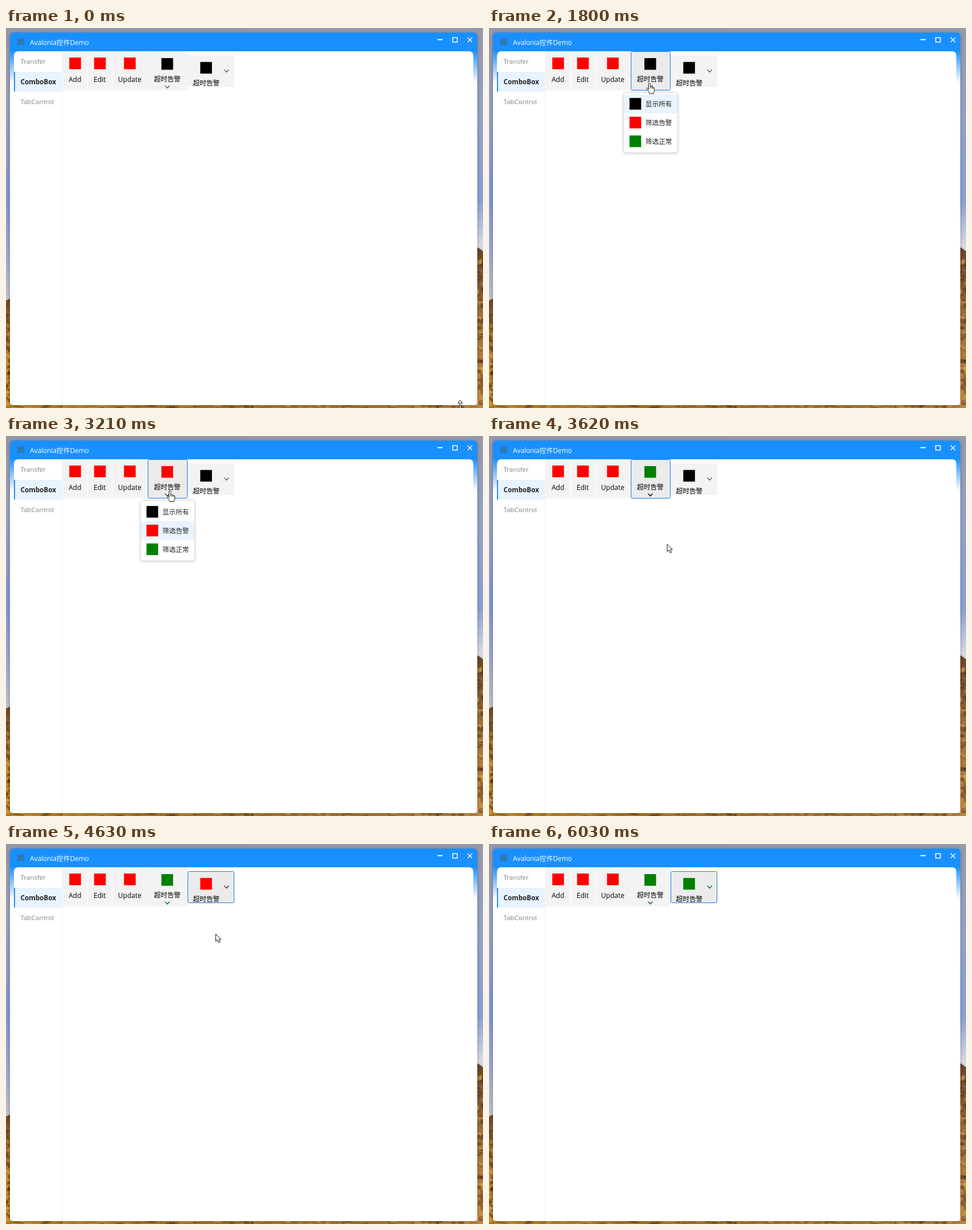
Recreate the animation shown at these times as an HTML page. Size 838 by 669 pixels, loop 6630 ms.

```html
<!DOCTYPE html>
<html lang="zh-CN">
<head>
<meta charset="utf-8">
<title>Avalonia控件Demo</title>
<style>
html, body { margin: 0; width: 100%; height: 100%; overflow: hidden; }
svg { display: block; width: 838px; height: 669px; }
text { font-family: "Open Sans", "Noto Sans CJK SC", "Noto Sans CJK", sans-serif; font-size: 11.7px; white-space: pre; }
.title { font-size: 11.8px; font-weight: 500; fill: #fff; }
.tool { font-size: 12px; }
.nav { fill: #808080; font-size: 11.5px; }
</style>
</head>
<body>
<svg id="stage" viewBox="0 0 838 669" xmlns="http://www.w3.org/2000/svg">
  <defs>
    <linearGradient id="skyL" x2="0" y2="1">
      <stop offset="0" stop-color="#9496a9"/><stop offset=".2" stop-color="#9ba1bc"/>
      <stop offset=".45" stop-color="#8495cd"/><stop offset=".6" stop-color="#a0a8cf"/>
      <stop offset=".72" stop-color="#c2c2cd"/>
    </linearGradient>
    <linearGradient id="skyR" x2="0" y2="1">
      <stop offset="0" stop-color="#9799ab"/><stop offset=".25" stop-color="#93a2cc"/>
      <stop offset=".45" stop-color="#8b9dd2"/><stop offset=".57" stop-color="#d3d8e4"/>
    </linearGradient>
    <linearGradient id="rockL" x2="0" y2="1">
      <stop offset="0" stop-color="#6b4527"/><stop offset=".3" stop-color="#a06a2c"/>
      <stop offset="1" stop-color="#cf8c1c"/>
    </linearGradient>
    <linearGradient id="rockR" x2="0" y2="1">
      <stop offset="0" stop-color="#6a4529"/><stop offset=".5" stop-color="#a27039"/>
      <stop offset="1" stop-color="#c68f43"/>
    </linearGradient>
    <linearGradient id="ground">
      <stop offset="0" stop-color="#c78716"/><stop offset=".5" stop-color="#a46f22"/>
      <stop offset="1" stop-color="#b98238"/>
    </linearGradient>
    <linearGradient id="frame" gradientUnits="userSpaceOnUse" x1="0" y1="40" x2="0" y2="97">
      <stop offset="0" stop-color="#1890ff"/><stop offset="1" stop-color="#fff"/>
    </linearGradient>
    <filter id="soft" x="-10%" y="-10%" width="120%" height="120%"><feGaussianBlur stdDeviation="2.5"/></filter>
    <clipPath id="label2"><rect x="320" y="48" width="80" height="54.5"/></clipPath>
    <clipPath id="land"><path id="ridge" d="M0 480L7 476V664H828V386L833 389L838 393V669H0Z"/></clipPath>
  </defs>

  <rect width="419" height="669" fill="url(#skyL)"/>
  <rect x="419" width="419" height="669" fill="url(#skyR)"/>
  <path d="M0 480L7 476V669H0Z" fill="url(#rockL)"/>
  <path d="M828 386L833 389L838 393V669H828Z" fill="url(#rockR)"/>
  <rect y="664" width="838" height="5" fill="url(#ground)"/>
  <g id="stones" clip-path="url(#land)"></g>
  <rect x="6" y="8" width="823" height="658" rx="7" fill="#000" opacity=".22" filter="url(#soft)"/>

  <rect x="7" y="8" width="821" height="656" rx="6" fill="url(#frame)"/>
  <rect x="14" y="41" width="807" height="623" rx="7" fill="#fff"/>
  <rect x="20" y="18" width="12" height="12" fill="#2d7bb5"/>
  <text class="title" x="42" y="30.3">Avalonia控件Demo</text>
  <g fill="none" stroke="#fff">
    <path d="M758 20.5H767" stroke-width="2"/>
    <rect x="784.8" y="16.8" width="8" height="8" stroke-width="1.5"/>
    <path d="M811 16.8L819.2 25M819.2 16.8L811 25" stroke-width="1.3"/>
  </g>

  <rect x="98.5" y="41" width="1" height="623" fill="#e9e9e9"/>
  <rect x="14" y="77" width="84.5" height="35" fill="#e7f3ff"/>
  <rect x="14" y="77" width="1.7" height="35" fill="#1677d8"/>
  <text class="nav" x="25.5" y="63.3">Transfer</text>
  <text x="25.5" y="98.6" font-weight="700" fill="#222">ComboBox</text>
  <text class="nav" x="25.5" y="134">TabControl</text>

  <g id="tools"></g>
  <g id="popup"></g>
  <g id="cursor"></g>
</svg>
<script>
const $ = id => document.getElementById(id);
const LOOP = 6630;
const COLORS = ["#000", "#f00", "#008000"];
const ITEMS = ["显示所有", "筛选告警", "筛选正常"];
const BUTTONS = [
  { id: "add", label: "Add", x: 100, w: 43, icon: 111.2, tx: 110 },
  { id: "edit", label: "Edit", x: 144.5, w: 41.5, icon: 154.8, tx: 154 },
  { id: "update", label: "Update", x: 187, w: 61.5, icon: 207.3, tx: 196.8 }
];
const COMBOS = {
  c1: { x: 249.5, y: 41.5, w: 69, h: 68, icon: [273, 53], text: [260, 94.3], arrow: [283.5, 103.5], popup: [236.5, 113.5] },
  c2: { x: 319.5, y: 48.5, w: 81, h: 55, icon: [341.3, 59.8], text: [328.5, 100.7], arrow: [387.5, 75.5], popup: [312.5, 107.5], clip: "label2" }
};

// time, cursor, x, y, hovered control, colour of c1 and c2, focused combo, open popup, hovered row
const STEPS = [
  [0, "resize", 798, 655],
  [200, "arrow", 610, 470],
  [400, "arrow", 395, 265],
  [600, "arrow", 205, 140],
  [800, "hand", 139.5, 86, "add"],
  [1000, "hand", 162, 88, "edit"],
  [1200, "arrow", 157, 117],
  [1400, "hand", 218, 90, "update"],
  [1600, "hand", 280, 90, "c1"],
  [1800, "hand", 282, 97, "c1", 0, 0, "c1", 1],
  [2000, "hand", 284, 126, "", 0, 0, "c1", 1, 0],
  [2210, "hand", 287, 155, "", 0, 0, "c1", 1, 1],
  [2410, "hand", 288, 169, "", 0, 0, "c1", 1, 1],
  [2620, "faded", 288.5, 168.5, "", 0, 0, "c1"],
  [2820, "hand", 286, 92, "c1", 1, 0, "c1"],
  [3020, "hand", 288, 97, "c1", 1, 0, "c1", 1],
  [3220, "hand", 300, 165, "", 1, 0, "c1", 1, 1],
  [3420, "hand", 312, 190, "", 1, 0, "c1", 1, 2],
  [3620, "arrow", 312.5, 190, "c1", 2, 0, "c1"],
  [3820, "hand", 362, 80, "c2", 2, 0],
  [4020, "hand", 366, 88, "c2", 2, 0, "c2", 1],
  [4220, "hand", 368, 135, "", 2, 0, "c2", 1, 0],
  [4430, "hand", 368, 158, "", 2, 0, "c2", 1, 1],
  [4630, "arrow", 368, 158, "c2", 2, 1, "c2"],
  [4830, "hand", 367, 88, "c2", 2, 1, "c2"],
  [5030, "hand", 367, 92, "c2", 2, 1, "c2", 1],
  [5230, "hand", 367, 132, "", 2, 1, "c2", 1],
  [5430, "hand", 370, 185, "", 2, 1, "c2", 1, 2],
  [5630, "arrow", 370, 185, "c2", 2, 2, "c2"],
  [5830, "arrow", 741, 626, "c2", 2, 2, "c2"],
  [6030, "", 0, 0, "c2", 2, 2, "c2"]
];

const ARROW = '<path d="M.5 .5V13.4L3.5 10.7L5.7 15.7L8 14.7L5.8 9.9H9.8Z" fill="#fff" stroke="#111"/>';
const SHAPES = {
  arrow: ARROW,
  faded: `<g opacity=".5">${ARROW}</g>`,
  hand: '<path d="M-1.5 12V1.3Q-1.5 -.2 0 -.2T1.5 1.3V6.2Q3.8 5.3 4.3 7Q6.3 6.4 6.7 8Q8.6 7.6 8.6 9.8V13Q8.6 15.2 7 16.8V18.6H-.3V17Q-1.8 15.2-3.1 12.7L-4.8 10Q-5.2 8.2-3.6 8.4Q-2.3 9.2-1.5 10.8M1.5 6.2V9.5M4.3 7V10M6.7 8V10.4" fill="#fff" stroke="#222" stroke-linejoin="round"/>',
  resize: '<path d="M0 .5L4 5H1.3V17H4L0 21.5L-4 17H-1.3V5H-4Z" fill="#fff" stroke="#111"/>'
};

const rect = (x, y, w, h, fill, more = "") =>
  `<rect x="${x}" y="${y}" width="${w}" height="${h}" fill="${fill}" ${more}/>`;
const text = (x, y, s, more = "") => `<text x="${x}" y="${y}" ${more}>${s}</text>`;
const icon = (x, y, color) => rect(x, y, 20.5, 20.5, color);
const surface = hovered => hovered ? "#ebebeb" : "#f3f3f3";

function button(b, hover) {
  return rect(b.x, 41, b.w, 68.5, surface(hover === b.id), 'rx="2"') +
    icon(b.icon, 52, COLORS[1]) + text(b.tx, 95.2, b.label, 'class="tool"');
}

function combo(id, color, hover, focus) {
  const c = COMBOS[id], [ax, ay] = c.arrow;
  const lit = hover === id, focused = focus === id;
  const fill = surface(lit);
  const tint = color === 2 ? (lit && id === "c1" ? "#111" : "#146b48") : focused ? "#4b4260" : "#63637c";
  const clip = c.clip ? `clip-path="url(#${c.clip})"` : "";
  return rect(c.x, c.y, c.w, c.h, fill, `rx="2" stroke="${focused ? "#1677e8" : fill}"`) +
    icon(...c.icon, COLORS[color]) + text(...c.text, "超时告警", clip) +
    `<path d="M${ax - 4} ${ay - 2}l4 4l4 -4" fill="none" stroke="${tint}" stroke-width="1.6"/>`;
}

function menu(id, selected, row) {
  const [x, y] = COMBOS[id].popup;
  let out = rect(x, y + 1, 95, 106, "#000", 'rx="4" opacity=".22" filter="url(#soft)"') +
    rect(x, y, 95, 106, "#fff", 'rx="4" stroke="#dcdcdc"');
  ITEMS.forEach((label, i) => {
    const top = y + 3.5 + i * 33;
    const fill = i === selected ? (i === row ? "#cae5ff" : "#e8f4ff") : i === row ? "#e8f4ff" : "";
    if (fill) out += rect(x + .5, top, 94, 33, fill);
    out += icon(x + 10.3, top + 6.2, COLORS[i]) + text(x + 38.3, top + 20.8, label, 'fill="#222"');
  });
  return out;
}

// Loose light and dark patches on the hills, thinning to shade near the ridge.
function stones() {
  let seed = 7, out = "";
  const rnd = () => (seed = seed * 16807 % 2147483647) / 2147483647;
  const patch = (x, y, w, h) => {
    const fill = rnd() < .55 ? "#e0a552" : "#4a2c14";
    out += `<ellipse cx="${x}" cy="${y}" rx="${w}" ry="${h}" fill="${fill}" opacity="${.2 + rnd() * .4}"/>`;
  };
  for (let i = 0; i < 90; i++) {
    patch(rnd() * 7, 500 + rnd() * 169, 1 + rnd() * 3, 1 + rnd() * 3);
    patch(828 + rnd() * 10, 410 + rnd() * 259, 1 + rnd() * 4, 1 + rnd() * 4);
    patch(rnd() * 838, 664 + rnd() * 5, 2 + rnd() * 7, 1 + rnd());
  }
  return out;
}

function draw([, kind, x, y, hover = "", first = 0, second = 0, focus = "", open = 0, row = -1]) {
  $("tools").innerHTML = BUTTONS.map(b => button(b, hover)).join("") +
    combo("c1", first, hover, focus) + combo("c2", second, hover, focus);
  $("popup").innerHTML = open ? menu(focus, focus === "c1" ? first : second, row) : "";
  $("cursor").innerHTML = SHAPES[kind] || "";
  $("cursor").setAttribute("transform", `translate(${x} ${y})`);
}

$("stones").innerHTML = stones();
let shown;
const start = performance.now();
function tick() {
  const t = Math.max(0, performance.now() - start) % LOOP;
  const step = STEPS.findLast(s => s[0] <= t);
  if (step !== shown) draw(shown = step);
  requestAnimationFrame(tick);
}
tick();
</script>
</body>
</html>
```
